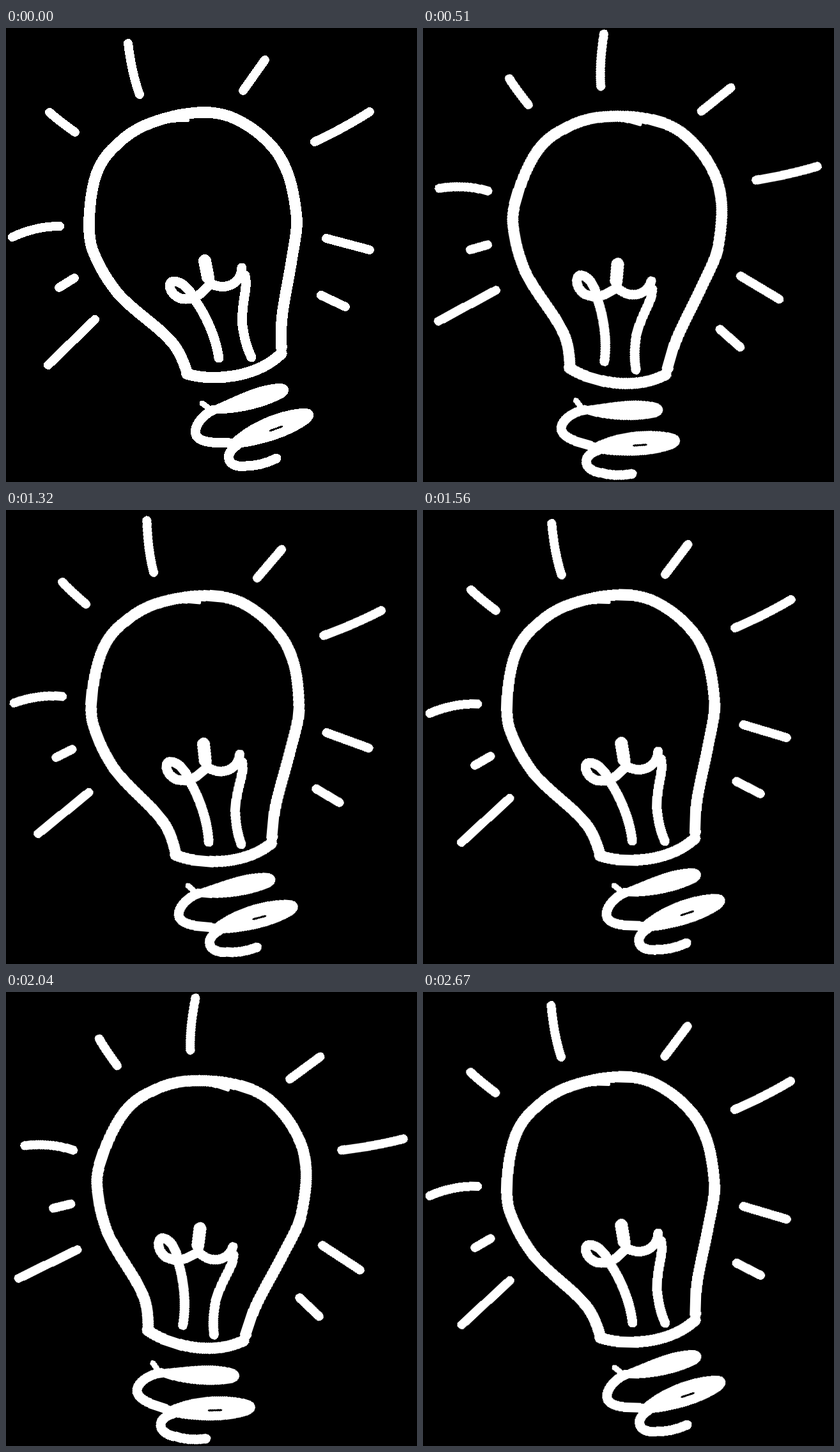
Animation, 643 px wide and 710 px high, one loop 2700 ms. Source, as an HTML page:

```html
<!DOCTYPE html>
<html lang="en">
<head>
<meta charset="utf-8">
<title>Swinging light bulb</title>
<style>
  html, body {
    margin: 0;
    width: 100%;
    height: 100%;
    overflow: hidden;
    background: #000;
  }
  svg {
    display: block;
    width: 643px;
    height: 710px;
    shape-rendering: crispEdges;
  }
  .bulb {
    fill: none;
    stroke: #fff;
    stroke-linecap: round;
    stroke-linejoin: round;
    transform-origin: 289px 344px;
    animation: swing 2700ms infinite;
  }
  .rays { stroke-width: 14px; }
  .glass { stroke-width: 17.5px; }
  .wire { stroke-width: 15px; }
  .thin { stroke-width: 9px; }
  .solid { fill: #fff; stroke-width: 2px; }

  /* each leg advances in 30 ms ticks */
  @keyframes swing {
    0%      { transform: rotate(0deg);    animation-timing-function: steps(17); }
    18.888% { transform: rotate(16deg);   animation-timing-function: steps(12); }
    32.222% { transform: rotate(14.9deg); animation-timing-function: steps(7); }
    40%     { transform: rotate(12.4deg); animation-timing-function: steps(14); }
    55.555% { transform: rotate(-.2deg);  animation-timing-function: steps(25); }
    83.333% { transform: rotate(25.5deg); animation-timing-function: steps(15); }
    100%    { transform: rotate(0deg); }
  }
</style>
</head>
<body>
<svg viewBox="0 0 643 710">
  <g class="bulb">
    <g class="rays">
      <path d="M191 24Q197 72 209 104"/>
      <path d="M405 50L371 98"/>
      <path d="M68 132Q84 146 108 163"/>
      <path d="M569 131Q530 156 483 178"/>
      <path d="M10 327Q46 310 84 310"/>
      <path d="M83 406L107 391"/>
      <path d="M139 456L66 527"/>
      <path d="M501 329L569 347"/>
      <path d="M493 418L531 436"/>
    </g>

    <g class="glass">
      <path d="M431 500C427 450 440 410 447 362C452 332 456 314 455 298
        C450 250 442 222 425 196C402 165 374 148 349 138C320 129 300 131 270 136
        C230 145 200 156 175 181C148 204 138 228 133 265C129 298 128 325 135 346
        C147 377 160 396 175 415C202 446 240 466 264 497Q275 513 283 538"/>
      <path d="M283 541C325 553 392 547 431 509"/>
      <path class="thin" d="M223 155Q247 141 283 143"/>
    </g>

    <g class="wire">
      <path d="M333 516C328 482 312 448 294 423C287 408 275 396 262 396
        C251 398 256 416 273 423C294 428 308 414 320 399"/>
      <path style="stroke-width:20px" d="M311 364L316 390"/>
      <path d="M318 397C331 410 367 408 369 375"/>
      <path d="M374 387C379 410 367 430 370 466Q374 495 384 515"/>
    </g>

    <g class="wire">
      <path class="thin" d="M307 587L318 595"/>
      <path d="M325 597C302 608 293 627 298 638C306 650 333 649 358 649"/>
      <path d="M362 652C341 667 347 682 363 685Q396 687 423 673"/>
      <path class="solid" d="M322 593C352 581 388 560 425 557C444 556 445 569 434 577
        C408 591 366 603 327 602Z"/>
      <path class="solid" d="M350 648C374 622 420 600 462 596C482 594 485 607 473 617
        C445 638 402 651 362 656Z"/>
      <path stroke="#000" style="stroke-width:3px" d="M413 630L432 623"/>
    </g>
  </g>
</svg>
</body>
</html>
```
